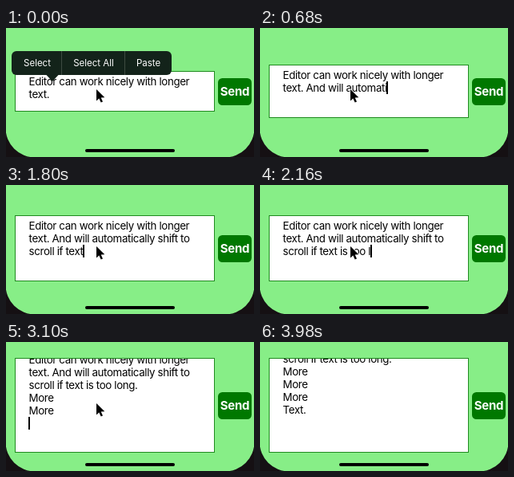
An HTML page with a canvas for the animation above (4 s loop, 310 by 162 pixels).

```html
<!DOCTYPE html>
<html lang="en">
<head>
<meta charset="utf-8">
<title>Growing text editor</title>
<style>
  html, body { margin: 0; width: 310px; height: 162px; overflow: hidden; background: #87ee87; }
  canvas { display: block; width: 310px; height: 162px; }
</style>
</head>
<body>
<canvas id="stage"></canvas>
<script>
const W = 310, H = 162, LOOP = 4000;
const FONT = 'Inter, Roboto, "Liberation Sans", sans-serif';
const canvas = document.getElementById('stage');
const ctx = canvas.getContext('2d');
const dpr = window.devicePixelRatio || 1;
canvas.width = W * dpr;
canvas.height = H * dpr;

const START = 'Editor can work nicely with longer\ntext.';
const TYPED = ' And will automatically shift to \nscroll if text is too long.' +
  '\nMore\nMore\nMore\nText.\n';

// [time, characters typed]
const KEYS = [[60, 0], [580, 14], [680, 18], [1120, 32], [1140, 33], [1180, 35],
  [1380, 38], [1640, 44], [2160, 57], [2220, 57], [2400, 61], [2460, 62],
  [2500, 62], [2760, 66], [2820, 67], [2960, 71], [2980, 72], [3110, 72],
  [3330, 76], [3360, 77], [3520, 82], [3540, 83]];
// [time, top edge of the editor]; it grows around y = 79.5
const TOPS = [[0, 54.5], [300, 46.5], [1800, 38.5], [2460, 30.5], [2820, 20.5]];
// [from, to, distance]
const SCROLLS = [[2980, 3080, 11], [3360, 3460, 16], [3540, 3660, 17]];

const clamp = v => Math.max(0, Math.min(1, v));
const part = (t, a, b) => clamp((t - a) / (b - a));
const ease = p => (1 - Math.cos(Math.PI * p)) / 2;

function lerpKeys(keys, t) {
  let v = keys[0][1];
  for (let i = 1; i < keys.length; i++) {
    const [t0, v0] = keys[i - 1], [t1, v1] = keys[i];
    if (t >= t0) v = v0 + (v1 - v0) * part(t, t0, t1);
  }
  return v;
}

function roundRect(x, y, w, h, r, color) {
  ctx.fillStyle = color;
  ctx.beginPath();
  ctx.roundRect(x, y, w, h, r);
  ctx.fill();
}

function polygon(points) {
  ctx.beginPath();
  points.forEach(([x, y]) => ctx.lineTo(x, y));
  ctx.closePath();
}

function text(str, x, y, font, color, spacing = 0, align = 'left') {
  ctx.font = font + ' ' + FONT;
  ctx.letterSpacing = spacing + 'px';
  ctx.textAlign = align;
  ctx.fillStyle = color;
  ctx.fillText(str, x, y);
}

function drawScreen() {
  ctx.fillStyle = '#151013';
  ctx.fillRect(0, 0, W, H);
  roundRect(-0.5, -60, 311, 222.5, 37, '#87ee87');
  roundRect(99, 152, 112, 4, 2, '#000');
  roundRect(265, 63, 42, 34, 5.5, '#007800');
  text('Send', 286, 85.3, '700 15px', '#fff', -0.3, 'center');
}

function drawEditor(t) {
  const top = TOPS.filter(k => t >= k[0]).pop()[1];
  const height = 2 * (79.5 - top);
  const scroll = SCROLLS.reduce((s, [a, b, d]) => s + d * ease(part(t, a, b)), 0);
  const count = Math.floor(lerpKeys(KEYS, t) + 1e-6);
  const lines = (START + TYPED.slice(0, count)).split('\n');
  const base = i => top + 17.8 + 16 * i - scroll;

  ctx.fillStyle = '#fff';
  ctx.fillRect(11.5, top, 249, height);
  ctx.save();
  ctx.beginPath();
  ctx.rect(12, top, 248, height);
  ctx.clip();
  lines.forEach((s, i) => text(s, 28.6, base(i), '400 13.3px', '#000', -0.36));
  if (t >= 60 && t < 3920) {
    const last = lines.length - 1;
    const x = 28.2 + ctx.measureText(lines[last]).width;
    ctx.fillRect(Math.round(x), Math.round(base(last) - 13), 2, 16);
  }
  ctx.restore();
  ctx.strokeStyle = '#1f8a1f';
  ctx.lineWidth = 1;
  ctx.strokeRect(11.5, top, 249, height);
}

function drawMenu(t) {
  const alpha = 1 - part(t, 60, 200);
  if (!alpha) return;
  const dark = '#13231a';
  ctx.globalAlpha = alpha;
  roundRect(7, 29, 200, 30, 6, dark);
  polygon([[50, 58.5], [66, 58.5], [58, 67]]);
  ctx.fill();
  ctx.fillStyle = '#3d4b41';
  ctx.fillRect(69, 29, 1, 30);
  ctx.fillRect(148, 29, 1, 30);
  [['Select', 39], ['Select All', 109.5], ['Paste', 178]].forEach(([s, x]) =>
    text(s, x, 48.2, '400 11.5px', '#fff', 0, 'center'));
  ctx.globalAlpha = 1;
}

function drawPointer(t) {
  const p = ease(part(t, 3680, 3960));
  ctx.save();
  ctx.translate(113 + 200 * p, 77 + 56 * p);
  polygon([[0, 0], [0, 14.5], [3.3, 11.4], [5.7, 16.6], [8, 15.6], [5.7, 10.5], [10.3, 10.3]]);
  ctx.lineJoin = 'round';
  ctx.lineWidth = 1.6;
  ctx.strokeStyle = '#fff';
  ctx.stroke();
  ctx.fillStyle = '#000';
  ctx.fill();
  ctx.restore();
}

let begin = null;
function draw(now) {
  if (begin === null) begin = now;
  const t = (now - begin) % LOOP;
  ctx.setTransform(dpr, 0, 0, dpr, 0, 0);
  drawScreen();
  drawEditor(t);
  drawMenu(t);
  drawPointer(t);
  requestAnimationFrame(draw);
}
requestAnimationFrame(draw);
</script>
</body>
</html>
```
